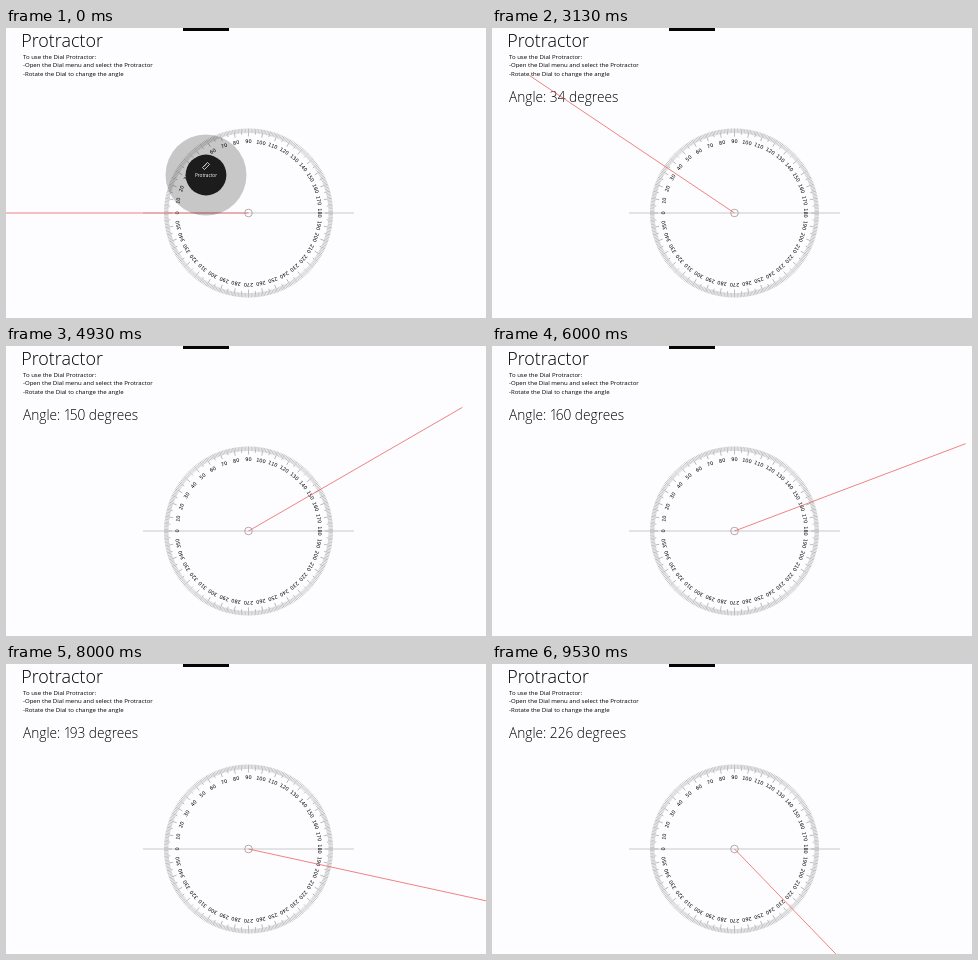
Write an HTML page with a canvas that moves like this. It is 480 by 290 pixels and loops after 9590 ms.

```html
<!DOCTYPE html>
<html lang="en">
<head>
<meta charset="utf-8">
<title>Protractor</title>
<style>
html, body { margin: 0; width: 100%; height: 100%; overflow: hidden; background: #fdfcfe; }
canvas { display: block; width: 480px; height: 290px; }
</style>
</head>
<body>
<canvas id="stage"></canvas>
<script>
const W = 480, H = 290, LOOP = 9590, STEP = 1000 / 15;
const CX = 242.5, CY = 185, ARM = 247;
const SANS = '"Open Sans", "Noto Sans", sans-serif';

const canvas = document.getElementById('stage');
const ctx = canvas.getContext('2d');
const ratio = window.devicePixelRatio || 1;
canvas.width = W * ratio;
canvas.height = H * ratio;

// Dial rotation: [time in ms, degrees]
const turns = [
  [1467, 0], [1870, 12.4], [2200, 16.5], [2470, 19], [2800, 24], [3130, 33.7],
  [3470, 58], [3830, 98], [4200, 131.1], [4470, 144.3], [4900, 149.8],
  [5330, 151.2], [5667, 151.2], [6000, 159.3], [6670, 171], [7300, 175.5],
  [7670, 179.6], [8000, 192.3], [8670, 218.2], [9100, 224], [9530, 226]
];
const last = turns.length - 1;

const slope = i => (turns[i + 1][1] - turns[i][1]) / (turns[i + 1][0] - turns[i][0]);

function tangent(i) {
  if (i === 0 || i === last) return 0;
  const a = slope(i - 1), b = slope(i);
  return a * b > 0 ? 2 * a * b / (a + b) : 0;
}

// Monotone cubic through the turns
function angleAt(t) {
  if (t <= turns[0][0]) return 0;
  if (t >= turns[last][0]) return turns[last][1];
  let i = 0;
  while (t >= turns[i + 1][0]) i++;
  const [t0, a0] = turns[i], [t1, a1] = turns[i + 1];
  const h = t1 - t0, u = (t - t0) / h, v = 1 - u;
  return a0 * (1 + 2 * u) * v * v + h * tangent(i) * u * v * v +
         a1 * u * u * (3 - 2 * u) - h * tangent(i + 1) * u * u * v;
}

function text(str, x, y, size, weight = 400, color = '#000') {
  ctx.font = `${weight} ${size}px ${SANS}`;
  ctx.fillStyle = color;
  ctx.fillText(str, x, y);
}

function line(x0, y0, x1, y1, color, width) {
  ctx.strokeStyle = color;
  ctx.lineWidth = width;
  ctx.beginPath();
  ctx.moveTo(x0, y0);
  ctx.lineTo(x1, y1);
  ctx.stroke();
}

function circle(x, y, r) {
  ctx.beginPath();
  ctx.arc(x, y, r, 0, Math.PI * 2);
}

function drawHeader() {
  ctx.fillStyle = '#050505';
  ctx.fillRect(177, 0, 46, 3);
  ctx.textAlign = 'left';
  text('Protractor', 15.3, 19, 17.9, 300);
  text('To use the Dial Protractor:', 17, 30.7, 6.05);
  text('-Open the Dial menu and select the Protractor', 17, 39.2, 6.05);
  text('-Rotate the Dial to change the angle', 17, 47.7, 6.05);
}

// The digit 1 is set tighter than the other figures
function drawReadout(angle) {
  let x = 17;
  for (const part of `Angle: ${Math.round(angle + 0.3)} degrees`.match(/\d|\D+/g)) {
    text(part, x, 73.5, 13.7, 300);
    x += ctx.measureText(part).width - (part === '1' ? 2 : 0);
  }
}

function drawProtractor() {
  ctx.save();
  ctx.translate(CX, CY);
  line(-105.5, 0, 105.5, 0, '#b4b4b4', 0.7);
  ctx.textAlign = 'center';
  for (let deg = 0; deg < 360; deg++) {
    const long = deg % 10 === 0, mid = deg % 5 === 0;
    ctx.save();
    ctx.rotate((deg - 90) * Math.PI / 180);
    line(0, -84.5, 0, long ? -76.5 : mid ? -78.5 : -80, mid ? '#8c8c8c' : '#a2a2a2', mid ? 0.55 : 0.55);
    if (long) {
      ctx.font = '5px "DejaVu Sans", sans-serif';
      ctx.fillStyle = '#000';
      ctx.fillText(deg, 0, -69.7);
    }
    ctx.restore();
  }
  ctx.strokeStyle = '#a89494';
  ctx.lineWidth = 0.8;
  circle(0, 0, 3.8);
  ctx.stroke();
  ctx.restore();
}

function drawArm(angle) {
  const a = angle * Math.PI / 180;
  line(CX, CY, CX - ARM * Math.cos(a), CY - ARM * Math.sin(a), '#ea5c5a', 0.75);
}

function drawMenu(alpha) {
  ctx.save();
  ctx.globalAlpha = alpha;
  ctx.fillStyle = 'rgba(0, 0, 0, 0.21)';
  circle(200, 147, 40.5);
  ctx.fill();
  ctx.fillStyle = '#1c1c1c';
  circle(200, 147, 20.4);
  ctx.fill();
  ctx.textAlign = 'center';
  text('Protractor', 200, 148.8, 4.7, 400, '#fff');
  ctx.translate(200, 138);
  ctx.rotate(-Math.PI / 4);
  ctx.strokeStyle = '#fff';
  ctx.lineWidth = 0.7;
  ctx.strokeRect(-3.6, -1.4, 7.2, 2.8);
  for (const x of [-1.6, 0, 1.6]) line(x, -1.4, x, -0.4, '#fff', 0.4);
  ctx.restore();
}

function draw(now) {
  const step = Math.floor((now % LOOP + 4) / STEP);
  const angle = angleAt(step * STEP);
  const menu = Math.min(1, Math.max(0, (10 - step) / 6));

  ctx.setTransform(ratio, 0, 0, ratio, 0, 0);
  ctx.fillStyle = '#fdfcfe';
  ctx.fillRect(0, 0, W, H);
  drawHeader();
  if (step >= 23) drawReadout(angle);
  drawProtractor();
  drawArm(angle);
  if (menu > 0) drawMenu(menu);
}

const start = performance.now();
function tick() {
  draw(performance.now() - start);
  requestAnimationFrame(tick);
}
tick();
</script>
</body>
</html>
```
